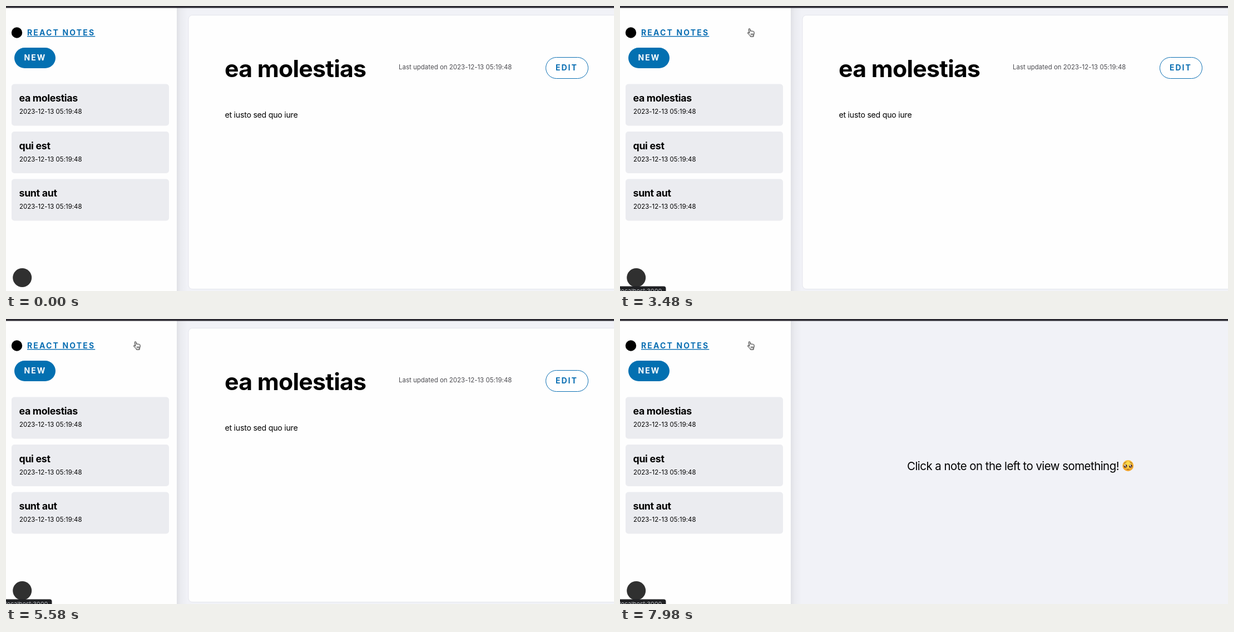
An HTML page that plays this animation: 1093x513 px, repeating every 8 s.

```html
<!DOCTYPE html>
<html lang="en">
<head>
<meta charset="utf-8">
<title>Notes</title>
<style>
  html, body { margin: 0; width: 100%; height: 100%; overflow: hidden; background: #fff; }
  svg { display: block; width: 1093px; height: 513px; }
  text { font-family: Inter, "Open Sans", sans-serif; fill: #000; }
  .label { font-size: 14px; font-weight: 700; letter-spacing: 2px; }
  .blue { fill: #0b6fb3; }
  .link { text-decoration: underline; letter-spacing: 2.15px; }
  .title { font-size: 42.8px; font-weight: 700; letter-spacing: -.75px; }
  .name { font-size: 17.8px; font-weight: 700; letter-spacing: -.33px; }
  .small { font-size: 11.4px; letter-spacing: .05px; }
  .body { font-size: 14.2px; letter-spacing: -.26px; }
  .hint { font-size: 20.5px; letter-spacing: -.56px; }
</style>
</head>
<body>
<svg viewBox="0 0 1093 513">
  <defs>
    <linearGradient id="shade">
      <stop offset="0" stop-color="#000" stop-opacity=".07"/>
      <stop offset=".35" stop-color="#000" stop-opacity=".03"/>
      <stop offset="1" stop-color="#000" stop-opacity="0"/>
    </linearGradient>
    <radialGradient id="skin" cy=".4">
      <stop offset=".4" stop-color="#ffd94a"/>
      <stop offset="1" stop-color="#f4a52b"/>
    </radialGradient>
  </defs>

  <rect x="307" width="786" height="513" fill="#f1f2f7"/>

  <g id="note">
    <rect x="328" y="16.5" width="780" height="493" rx="7" fill="#fefefe" stroke="#e4e5ec"/>
    <text class="title" x="393" y="128">ea molestias</text>
    <text class="small" x="706" y="114" style="fill:#4a4a4f">Last updated on 2023-12-13 05:19:48</text>
    <rect x="970.5" y="92.5" width="76" height="38" rx="19" fill="#fff" stroke="#0b6fb3"/>
    <text class="label blue" x="988" y="116">EDIT</text>
    <text class="body" x="393.5" y="201">et iusto sed quo iure</text>
  </g>

  <g id="empty" opacity="0">
    <text class="hint" x="516" y="271.5">Click a note on the left to view something!</text>
    <g transform="translate(913.3 264)">
      <circle r="10" fill="url(#skin)"/>
      <g fill="#5a3722">
        <circle cx="-4.6" cy=".8" r="3.1"/>
        <circle cx="4.6" cy=".8" r="3.1"/>
      </g>
      <g fill="#fff">
        <circle cx="-5.4" cy="-.5" r="1.3"/>
        <circle cx="3.8" cy="-.5" r="1.3"/>
        <circle cx="-3.8" cy="2.2" r=".8"/>
        <circle cx="5.4" cy="2.2" r=".8"/>
      </g>
      <path d="M-7 -4.4Q-4.6 -4.8 -3.3 -6.6M7 -4.4Q4.6 -4.8 3.3 -6.6M-2 7Q0 5.4 2 7"
        fill="none" stroke="#80501c" stroke-linecap="round"/>
    </g>
  </g>

  <rect x="307" y="3" width="19" height="510" fill="url(#shade)"/>
  <rect y="3" width="307" height="510" fill="#fefefe"/>
  <circle cx="19.5" cy="48" r="9.7"/>
  <text class="label blue link" x="38" y="53">REACT NOTES</text>
  <rect x="15" y="75" width="74" height="37" rx="18.5" fill="#0370b1"/>
  <text class="label" x="32.5" y="98" style="fill:#fff">NEW</text>
  <g id="list"></g>

  <circle cx="29.2" cy="489" r="17" fill="#303030"/>
  <g id="status" opacity="0">
    <path d="M0 504.5H78.5Q82.5 504.5 82.5 508.5V513H0Z" fill="#202124"/>
    <text x="-1" y="517" style="font-size:11px;letter-spacing:-.1px;fill:#bdc1c6">localhost:3000</text>
  </g>
  <rect width="1093" height="3.5" fill="#2d2b33"/>

  <g id="arrow" opacity="0">
    <path d="M.6 .8V14L3.7 11.2 5.7 15.8 8 14.8 6 10.3H10.2Z" fill="#000" stroke="#fff"/>
  </g>
  <g id="hand" opacity="0">
    <path d="M3.9 9.2L2.6 2.6C2.3 .6 4.6 .3 5 2L5.9 5.6C6.2 4.6 7.9 4.6 8.2 5.8C8.7 5 10.1 5.2 10.4 6.2C11 5.7 12.2 6 12.3 7.2C12.6 9.5 12.4 11 11.2 13V15.2H5.8C5.4 13.2 3 11.4 1 9.4C.2 8.2 1.6 7.4 2.6 8.1Z"
      fill="#fff" stroke="#000" stroke-linejoin="round"/>
    <path d="M6.8 9.6V12.6M8.6 9.6V12.6M10.3 9.6V12.6" stroke="#000" stroke-width=".8"/>
  </g>
</svg>
<script>
const LOOP = 8000;
const $ = id => document.getElementById(id);

$('list').innerHTML = ['ea molestias', 'qui est', 'sunt aut'].map((name, i) => `
  <g transform="translate(0 ${i * 85.5})">
    <rect x="10" y="140.5" width="283" height="75" rx="5" fill="#ebecf0"/>
    <text class="name" x="23.5" y="172">${name}</text>
    <text class="small" x="24" y="194">2023-12-13 05:19:48</text>
  </g>`).join('');

const start = document.timeline.currentTime ?? performance.now();

// Each step is [ms, value, easing to the next step].
function play(id, prop, steps) {
  const all = [[0, steps[0][1], 'step-end'], ...steps, [LOOP, steps.at(-1)[1]]];
  const frames = all.map(([ms, value, easing = 'linear']) =>
    ({ offset: ms / LOOP, [prop]: value, easing }));
  $(id).animate(frames, { duration: LOOP, iterations: Infinity }).startTime = start;
}

const at = (x, y) => `translate(${x}px, ${y}px)`;
const hold = 'step-end';
const PAGE = 6240, ENTER = 1660, HOVER = 2220;

play('note', 'opacity', [[0, 1, hold], [PAGE, 0, hold]]);
play('empty', 'opacity', [[0, 0, hold], [PAGE, 1, hold]]);
play('arrow', 'opacity', [[0, 0, hold], [ENTER, 1, hold], [HOVER, 0, hold]]);
play('arrow', 'transform', [[ENTER, at(308, 481), 'ease-out'], [1820, at(299, 46)]]);
play('hand', 'opacity', [[0, 0, hold], [HOVER, 1, hold]]);
play('hand', 'transform', [[HOVER + 20, at(297.7, 47), 'ease-in-out'], [2700, at(228.7, 39.8)]]);
play('status', 'opacity', [[0, 0, hold], [HOVER, .6], [2320, 1]]);
</script>
</body>
</html>
```
